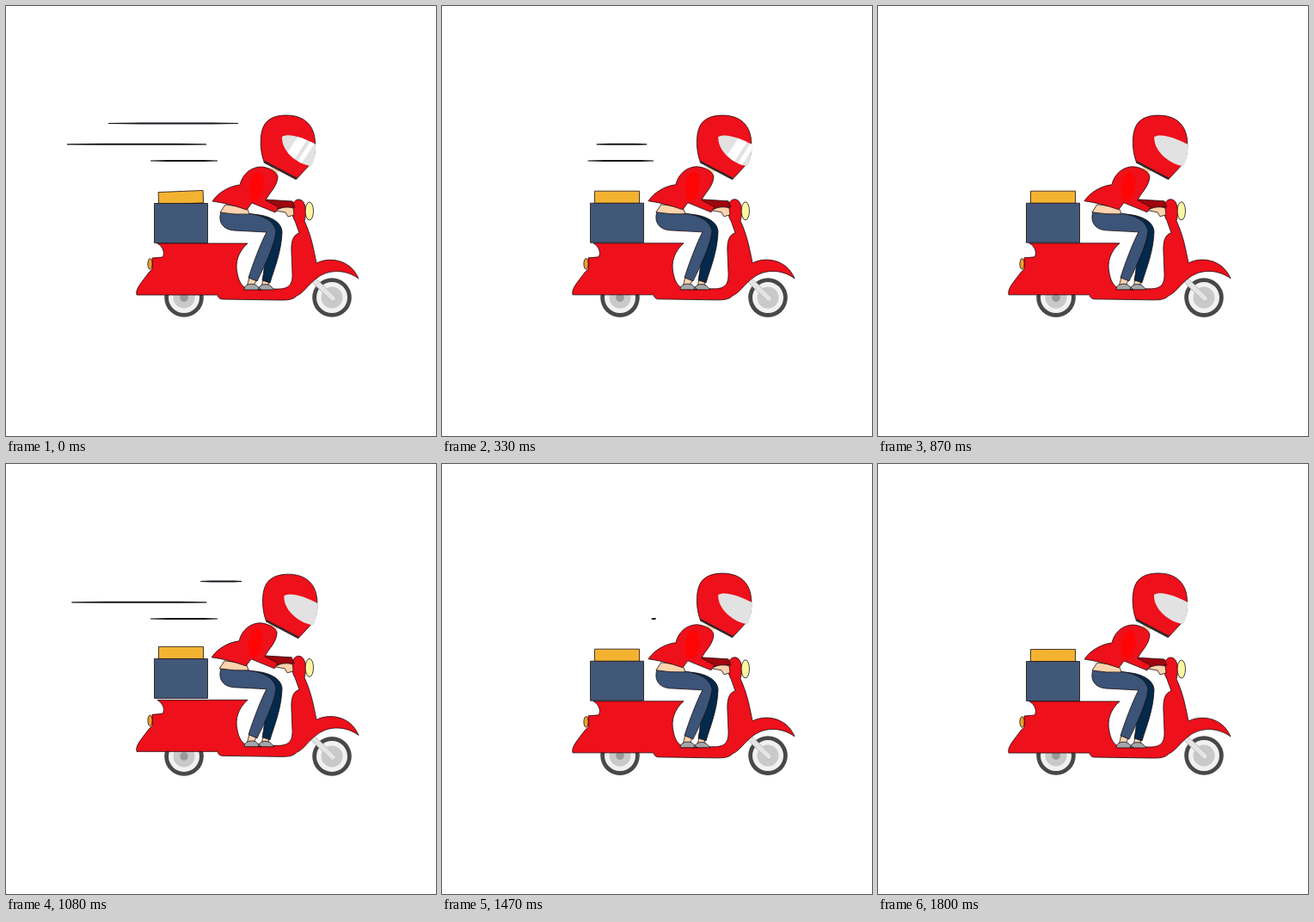
Animation of 500x500 px, one loop 1.86 s. Source, as an HTML page:

```html
<!DOCTYPE html>
<html lang="en">
<head>
<meta charset="utf-8">
<title>Scooter delivery</title>
<style>
html, body { margin: 0; width: 100%; height: 100%; overflow: hidden; background: #fff; }
svg { display: block; width: 100vw; height: 100vh; }
.red { fill: #ee101a; }
.skin { fill: #fcd3ad; }
.ink { stroke: #1b0d10; stroke-width: .8; }
</style>
</head>
<body>
<svg viewBox="0 0 500 500">
  <defs>
    <clipPath id="visor"><path d="M321 152C329 147 347 154 360.500 161C360 172 358 182 355 186C341 185 320 170 321 152Z"/></clipPath>
    <g id="wheel">
      <circle r="22.800" fill="#484848"/>
      <circle r="18" fill="#f1f1f1"/>
      <circle r="12.500" fill="#c9c9c9"/>
    </g>
  </defs>

  <g id="lines" fill="#14141c"></g>

  <g id="wheels">
    <use href="#wheel" x="207" y="339"/>
    <circle cx="207" cy="339" r="4.800" fill="#999"/>
    <use href="#wheel" x="379" y="339"/>
    <path d="M356 317L380 340" stroke="#bbb" stroke-width="7" stroke-linecap="round"/>
    <path d="M356 317L380 340" stroke="#e4e4e4" stroke-width="5.500" stroke-linecap="round"/>
  </g>

  <g id="scooter">
    <path class="red ink" d="M176 276H281C270 286 266 298 269 311C271 322 276 329 284 329H316C330 329 333 323 333 312L332 288C331 273 334 266 341 264L336 250C330 240 332 224 341 225C349 226 350 240 347 250C355 267 358 284 361 299C374 292 400 293 410 317C395 306 375 306 362 316C351 324 346 334 338 337C333 342 327 342 318 342L252 341Q247 341 246 336H152C150 329 158 321 166 310L170 306V293L182 292C185 288 183 280 176 276Z"/>
    <ellipse class="ink" cx="167.500" cy="300" rx="2.600" ry="6.300" fill="#f0a02c"/>
    <ellipse class="ink" cx="352.800" cy="238.500" rx="4.700" ry="10.500" fill="#fbf6a4"/>
  </g>

  <g id="cargo">
    <path id="parcel" class="ink" d="M177.500 215.500H229.500V230H177.500Z" fill="#f3b331"/>
    <path class="ink" d="M172.500 229.500H234.500V275.500H172.500Z" fill="#425878"/>
  </g>

  <g id="legs">
    <path class="skin ink" d="M283 315L280 327H287L291 319ZM299 317L297 328H304L306 320Z"/>
    <path class="ink" fill="#04294a" d="M282 242C306 242 321 251 321 263C320 287 312 305 307 322L298 319C302 298 302 280 306 264Z"/>
    <path class="ink" fill="#3b5478" d="M250 239C246 252 253 260 265 261L303 263C296 276 287 300 282 316L292 320C303 298 313 275 314 262C312 250 299 243 280 241Z"/>
    <path class="ink" fill="#a3a7a9" d="M277 330C277 324 284 322 290 324L297 330ZM293 330C294 324 302 322 307 325L312 330Z"/>
  </g>

  <g id="torso">
    <path class="skin" d="M307 187L316 186L319 191L311 198Z"/>
    <path class="skin ink" d="M255 231L249 240Q266 243 283 242L280 234Z"/>
    <path class="ink" fill="#a0060d" d="M300 225L333 227L336 234L315 236Z"/>
    <path class="red ink" d="M240 227C248 215 262 209 272 208C275 195 285 187 297 187C308 188 316 194 316 199C315 211 306 217 302 226L317 234L313 240L286 229L280 237Q257 229 240 227Z"/>
    <ellipse cx="291" cy="210" rx="8" ry="17" fill="#ff0505" transform="rotate(9 291 210)"/>
    <path class="skin ink" d="M314 238C319 234 327 233 334 235L335 243L328 245L325 240Z"/>
  </g>

  <g id="head">
    <path class="red ink" d="M300 181C295 168 295 150 299 141C304 129 317 127 326 127C346 127 359 138 359.500 159C360 175 357 181 351 187L338 201Z"/>
    <path d="M300 181L338 201" stroke="#33262a" stroke-width="2.600"/>
    <g clip-path="url(#visor)">
      <path d="M315 145H365V190H315Z" fill="#e2e2e3"/>
      <path id="glint" d="M342 148L325 174L333 182L353 151ZM356 154L337 184L341 187L360 158Z" fill="#fff"/>
    </g>
  </g>
</svg>
<script>
const LOOP = 1860, STEP = 30, GUST = 900, BOB = 300, TILT = 620;
const $ = id => document.getElementById(id);
const clamp = x => Math.min(1, Math.max(0, x));
const move = (id, x, y) => $(id).setAttribute("transform", `translate(${x} ${y})`);

// Speed lines: left, right, y, shrink start, shrink end, easing power, drift of the right end
const gusts = [
  [119, 270, 136.500, 12, 255, 1, 6],
  [71, 233, 160.800, 172, 415, 1, 8],
  [168, 246, 180, 310, 582, 1.5, 3]
];

function streak([left, right, y, from, to, power, drift], t) {
  const p = clamp((t - from) / (to - from)) ** power;
  if (p >= 1) return "";
  const end = right + drift * p, start = left + (end - left) * p;
  const w = end - start;
  return `<path d="M${start} ${y - .5}L${start + w * .25} ${y - 1}H${end - w * .2}L${end} ${y - .5}V${y + .6}L${end - w * .2} ${y + .9}H${start + w * .25}L${start} ${y + .6}Z"/>`;
}

function draw(now) {
  const t = Math.min(Math.floor(now % LOOP / STEP) * STEP, LOOP - 2 * STEP);
  const lift = (1 - Math.cos(t / BOB * 2 * Math.PI)) / 2;

  $("lines").innerHTML = t < 2 * GUST ? gusts.map(g => streak(g, t % GUST)).join("") : "";
  move("wheels", 0, lift);
  move("scooter", 0, -1.8 * lift);
  move("cargo", 0, -3.4 * lift);
  move("legs", 0, -1.4 * lift);
  move("torso", -lift, -2.4 * lift);
  move("head", 2.6 * lift, 1.3 * lift);

  const hop = clamp((t / TILT + .1) % 1 / .35);
  $("parcel").setAttribute("transform", `rotate(${-3 * Math.sin(hop * Math.PI)} 203 226)`);

  move("glint", 6 * (t / 330) ** 3, 0);
  requestAnimationFrame(draw);
}
const begin = performance.now();
const tick = () => { draw(performance.now() - begin); };
requestAnimationFrame(function frame() { draw.now = performance.now() - begin; });
tick();
</script>
</body>
</html>
```
